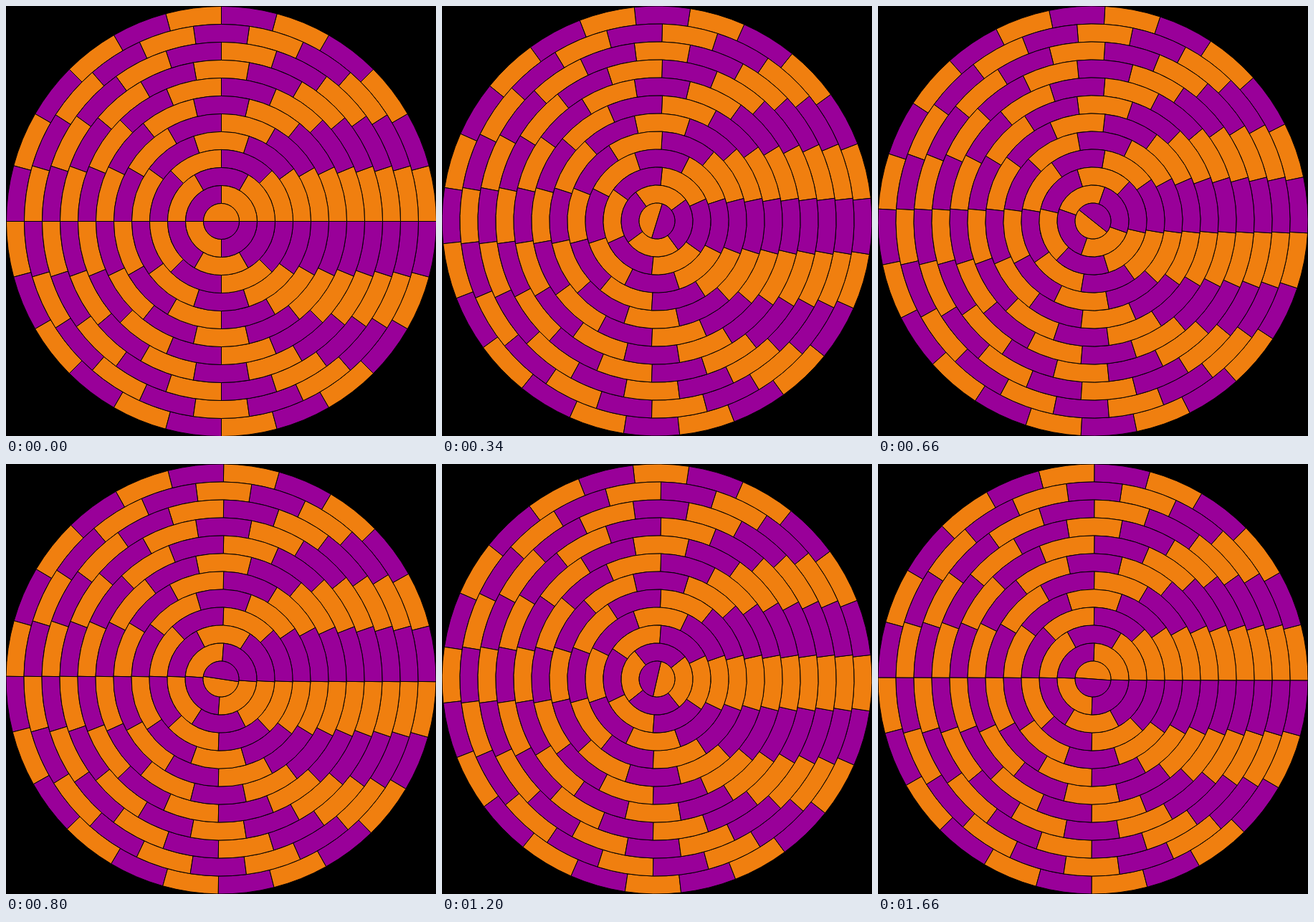
Recreate the animation shown at these times as an HTML page with a canvas. Size 600x600 px, loop 1680 ms.

```html
<!DOCTYPE html>
<html lang="en">
<head>
<meta charset="utf-8">
<title>Turning rings</title>
<style>
  html, body { margin: 0; width: 100%; height: 100%; overflow: hidden; background: #000; }
  canvas { display: block; width: 600px; height: 600px; }
</style>
</head>
<body>
<canvas id="stage" width="600" height="600"></canvas>
<script>
const ctx = document.getElementById('stage').getContext('2d');
const RINGS = 12;
const BAND = 25;
const STEP_MS = 20;
const STEPS = 84;
const TURN = Math.PI * 2;
const COLORS = ['#f07f0f', '#990099'];

// Ring k holds 2k tiles and makes 1/k of a turn per loop.
function drawRing(k, progress) {
  const outer = k * BAND;
  const inner = outer - BAND;
  const tile = TURN / (2 * k);
  const shift = progress * TURN / k;
  for (let i = 0; i < 2 * k; i++) {
    const from = -(shift + i * tile);
    const to = from - tile;
    ctx.beginPath();
    ctx.arc(0, 0, outer, from, to, true);
    if (inner) ctx.arc(0, 0, inner, to, from);
    ctx.closePath();
    ctx.fillStyle = COLORS[i % 2];
    ctx.fill();
    ctx.stroke();
  }
}

function draw(step) {
  ctx.setTransform(1, 0, 0, 1, 0, 0);
  ctx.fillStyle = '#000';
  ctx.fillRect(0, 0, 600, 600);
  // Half a pixel keeps the seams crisp while they lie on the axes.
  const center = step % (STEPS / 2) ? 300 : 300.5;
  ctx.translate(center, center);
  ctx.lineWidth = 1;
  ctx.strokeStyle = '#000';
  for (let k = RINGS; k > 0; k--) drawRing(k, step / STEPS);
}

const start = performance.now();
function tick() {
  const elapsed = performance.now() - start;
  draw(Math.floor(elapsed / STEP_MS) % STEPS);
  requestAnimationFrame(tick);
}
tick();
</script>
</body>
</html>
```
